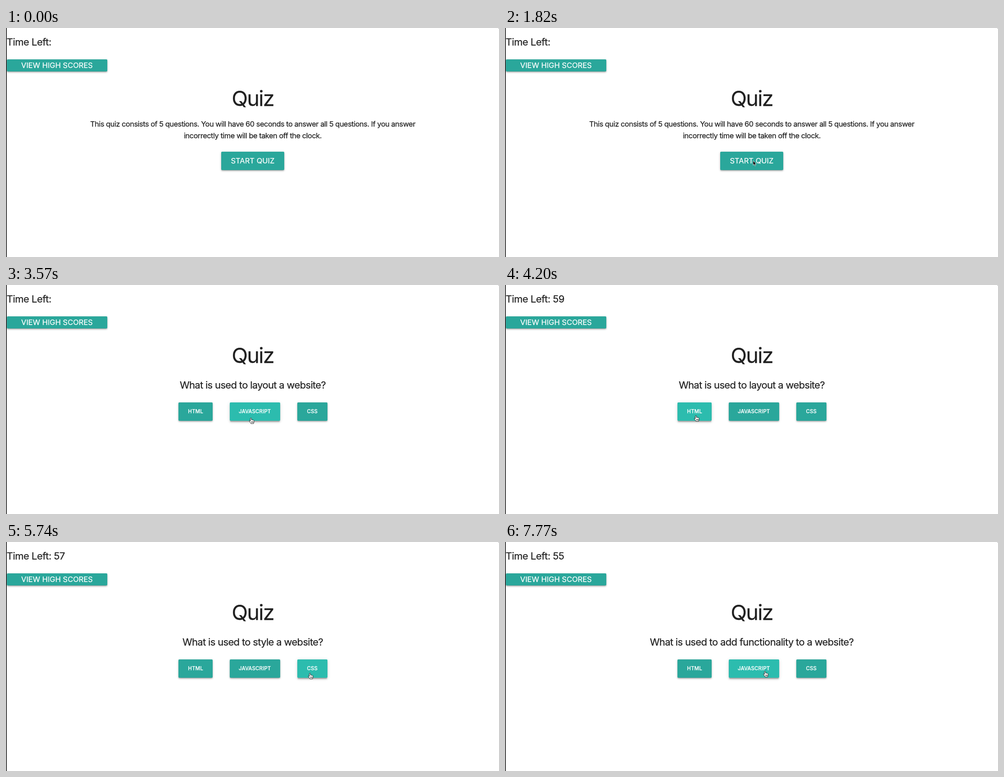
These frames come from a looping animation (1095 px wide and 511 px high, 8 s). An HTML page:

```html
<!DOCTYPE html>
<html lang="en">
<head>
<meta charset="utf-8">
<title>Quiz</title>
<style>
  html, body { margin: 0; width: 100%; height: 100%; overflow: hidden; background: #fff; }
  body {
    position: relative; color: #212121;
    font-family: Inter, "Liberation Sans", sans-serif;
    font-optical-sizing: none;
    -webkit-font-smoothing: antialiased;
    -webkit-text-stroke: .25px currentColor;
  }
  body > * { position: absolute; white-space: nowrap; }
  .edge { left: 0; top: 0; width: 2px; height: 511px; background: linear-gradient(90deg, #111 50%, #777 50%); }
  .corner { left: 1094px; top: 0; width: 1px; height: 1px; background: #555; }
  .center { left: 1px; width: 1094px; text-align: center; }
  .head { font-size: 22px; letter-spacing: -.67px; line-height: 30px; }
  #time { left: 1.5px; top: 16px; letter-spacing: -.5px; }
  #title { top: 127px; font-size: 47px; line-height: 60px; letter-spacing: -1.9px; }
  #intro { top: 201px; font-size: 16.4px; line-height: 26px; letter-spacing: -.48px; }
  #question { top: 207.5px; }
  .btn {
    box-sizing: border-box; border-radius: 2px; overflow: hidden;
    color: #fff; text-align: center; font-size: 16.5px;
    background: #2aa79b;
    box-shadow: 0 2.3px 2.3px rgba(0,0,0,.14), 0 3.4px 1.2px -2.3px rgba(0,0,0,.12), 0 1.2px 5.8px rgba(0,0,0,.2);
  }
  .answer { top: 262px; height: 41px; line-height: 41.5px; font-size: 11.5px; font-weight: 500; letter-spacing: .1px; }
  #scores { left: 2px; top: 70px; width: 222.5px; height: 27px; line-height: 27.5px; }
  #start { left: 478px; top: 275.5px; width: 140px; height: 41px; line-height: 41px; }
  #ripple {
    position: absolute; left: 55px; top: 3.5px; width: 36px; height: 36px;
    border-radius: 50%; background: rgba(255,255,255,.12);
  }
  #pointer { left: 0; top: 0; overflow: visible; }
</style>
</head>
<body>
<div class="edge"></div>
<div class="corner"></div>
<div id="time" class="head"></div>
<div id="scores" class="btn">VIEW HIGH SCORES</div>
<div id="title" class="center">Quiz</div>
<div id="intro" class="center">This quiz consists of 5 questions. You will have 60 seconds to answer all 5 questions. If you answer<br>incorrectly time will be taken off the clock.</div>
<div id="start" class="btn">START QUIZ<i id="ripple"></i></div>
<div id="question" class="center head"></div>
<svg id="pointer" width="20" height="20">
  <path id="arrow" d="M0 0V10L2.3 8L4 11.8L5.8 11L4.2 7.3H7.2Z" fill="#000" stroke="#fff" stroke-width=".8"/>
  <path id="hand" d="M-1.2 1Q0 -.6 1.2 1V4.6Q2.2 4 3.2 4.9Q4.4 4.3 5.2 5.3Q6.6 5 7 6.3V9Q7 10.5 6 12V13H0Q-.3 11.5 -3 8.5Q-4.5 6.6 -3.2 6.3Q-2 6.2 -1.2 7.6ZM1.4 8V11M3.2 8V11M5 8V11" fill="#fff" stroke="#111" stroke-width=".9"/>
</svg>
<script>
const LOOP = 8000, STEP = 70, BEGIN = 2450;
const $ = id => document.getElementById(id);

// Hover spans are [enter, leave, cut]; a cut span ends without a fade.
const answers = [
  { label: 'HTML', x: 383, w: 76, hovers: [[3880, 4410, true], [4480, 5260]] },
  { label: 'JAVASCRIPT', x: 496.5, w: 112.5, hovers: [[2560, 3790], [5290, 5420], [7465, LOOP]] },
  { label: 'CSS', x: 647, w: 66.5, hovers: [[5470, 5880, true], [5950, 7355]] }
];
const questions = [
  [BEGIN, 'What is used to layout a website?'],
  [4410, 'What is used to style a website?'],
  [5880, 'What is used to add functionality to a website?']
];
// Pointer path: time, x, y
const path = [
  [420, 544, 464], [490, 552, 405], [560, 564, 357],
  [770, 564, 357], [910, 545, 330], [1050, 545, 305], [1120, 551, 296],
  [3220, 551, 296], [3290, 551, 297],
  [3500, 551, 297], [3710, 530, 295], [3920, 440, 291], [4060, 424, 291],
  [5040, 424, 291], [5250, 450, 296], [5320, 530, 299], [5460, 640, 299], [5600, 675, 292.5],
  [7140, 675, 292.5], [7350, 650, 292], [7490, 600, 290], [7630, 577.5, 288]
];

for (const a of answers) {
  a.el = document.createElement('div');
  a.el.className = 'btn answer';
  a.el.textContent = a.label;
  a.el.style.left = a.x + 'px';
  a.el.style.width = a.w + 'px';
  $('pointer').before(a.el);
}

const mix = (a, b, k) => a + (b - a) * k;
const easeOut = k => 1 - (1 - Math.min(1, Math.max(0, k))) ** 2;
const show = (el, on) => { el.style.visibility = on ? 'visible' : 'hidden'; };

function pointerAt(t) {
  const i = path.findIndex(p => p[0] > t);
  if (i < 0) return path[path.length - 1].slice(1);
  if (i === 0) return path[0].slice(1);
  const [t0, x0, y0] = path[i - 1], [t1, x1, y1] = path[i];
  const k = (t - t0) / (t1 - t0);
  return [mix(x0, x1, k), mix(y0, y1, k)];
}

function hoverLevel(spans, t) {
  let level = 0;
  for (const [enter, leave, cut] of spans) {
    const fade = cut ? +(t >= leave) : easeOut((t - leave) / 200);
    level = Math.max(level, easeOut((Math.min(t, leave) - enter) / 200) * (1 - fade));
  }
  return level;
}

function paintAnswer(a, t) {
  const h = hoverLevel(a.hovers, t);
  const px = (from, to) => mix(from, to, h) + 'px';
  a.el.style.background = `rgb(${mix(42, 44, h)},${mix(167, 188, h)},${mix(155, 174, h)})`;
  a.el.style.boxShadow =
    `0 ${px(2.3, 3.4)} ${px(2.3, 3.4)} rgba(0,0,0,.14),` +
    `0 ${px(3.4, 1.2)} ${px(1.2, 8)} ${px(-2.3, 0)} rgba(0,0,0,.12),` +
    `0 ${px(1.2, 3.4)} ${px(5.8, 1.2)} ${px(0, -1.2)} rgba(0,0,0,.2)`;
  show(a.el, t >= BEGIN);
}

function draw(t) {
  const started = t >= BEGIN;
  const ticks = Math.floor((t - 2660) / 1015);
  $('time').textContent = 'Time Left:' + (ticks > 0 ? ' ' + (60 - ticks) : '');

  show($('intro'), !started);
  show($('start'), !started);
  show($('ripple'), t >= 1750 && t < 1820);
  const asked = questions.filter(q => t >= q[0]).pop();
  $('question').textContent = asked ? asked[1] : '';
  answers.forEach(a => paintAnswer(a, t));

  const [x, y] = pointerAt(t);
  const over = t > BEGIN && answers.some(a => x >= a.x && x <= a.x + a.w);
  $('pointer').style.transform = `translate(${x}px,${y}px)`;
  show($('arrow'), t >= 420 && !over);
  show($('hand'), over);
}

const origin = performance.now();
function frame() {
  const t = (performance.now() - origin) % LOOP;
  draw(Math.floor(t / STEP) * STEP);
  requestAnimationFrame(frame);
}
frame();
</script>
</body>
</html>
```
